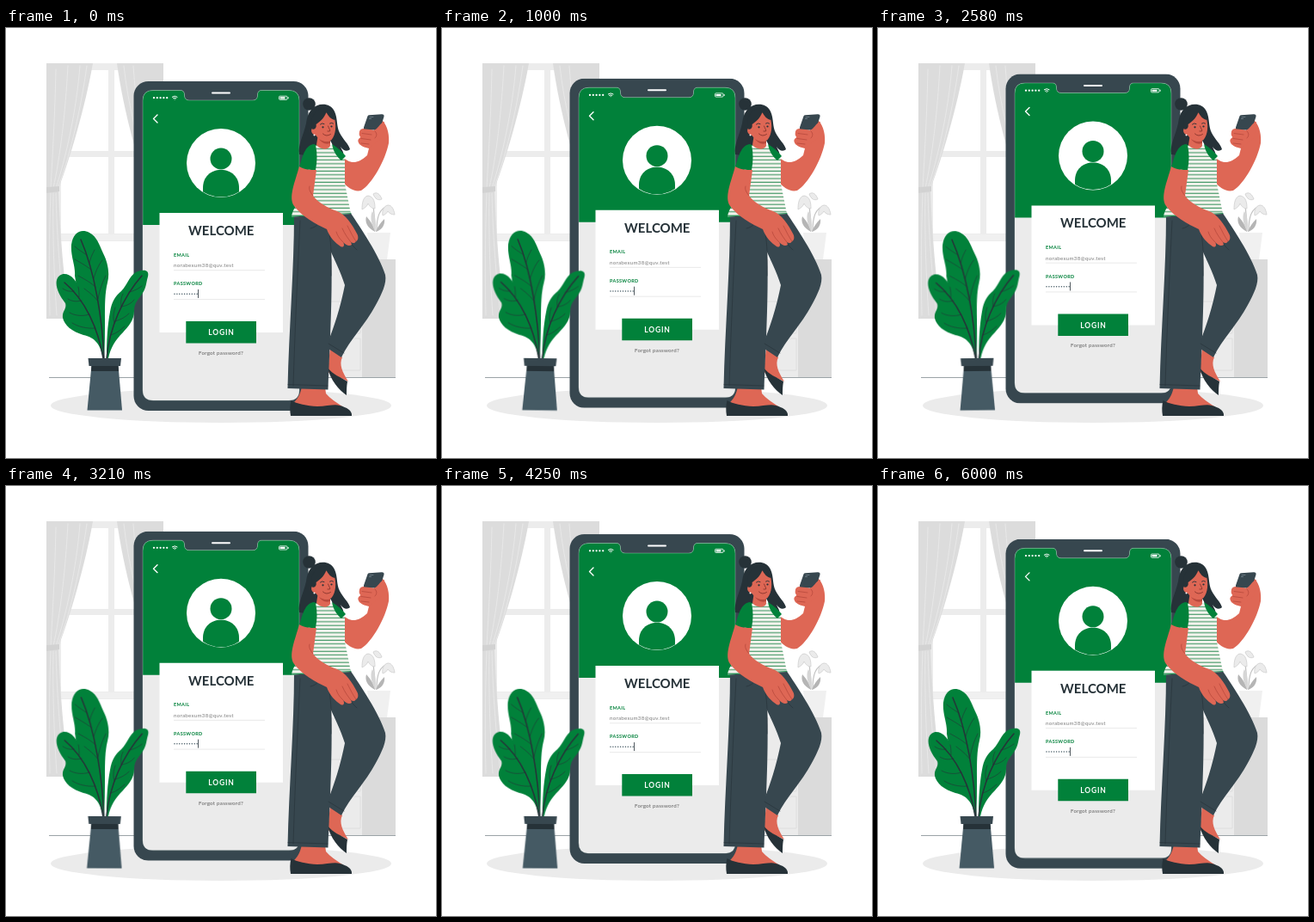
Write an HTML page that moves like this. It is 500 px wide and 500 px high and loops after 6040 ms.

```html
<!DOCTYPE html>
<html lang="en">
<head>
<meta charset="utf-8">
<title>Welcome login</title>
<style>
  html, body { margin: 0; width: 100%; height: 100%; overflow: hidden; background: #fff; }
  svg { display: block; width: 100%; height: 100%; font-family: Lato, "Open Sans", sans-serif; }
  .green { fill: #01813a; }
  .slate { fill: #37474f; }
  .ink { fill: #263238; }
  .skin { fill: #de6755; }
  .line { fill: none; stroke-linecap: round; stroke-linejoin: round; }
  .label { font-size: 5.5px; font-weight: 700; letter-spacing: .35px; }
  .small { font-size: 6.2px; letter-spacing: .25px; }
  #plant { transform-origin: 112px 340px; }
</style>
</head>
<body>
<svg viewBox="0 0 500 500">
  <defs>
    <pattern id="stripes" width="80" height="4.3" y="1" patternUnits="userSpaceOnUse">
      <rect width="80" height="4.3" fill="#f4f4ee"/>
      <rect y="1.5" width="80" height="1.1" fill="#3f9663"/>
    </pattern>
    <clipPath id="avatar"><circle cx="250" cy="157" r="39.5"/></clipPath>
    <clipPath id="screen"><path id="screenShape" d="M171 72.500H203Q207 72.500 207.500 77V79Q208 84 213 84H287Q292 84 292.500 79V77Q293 72.500 297 72.500H329Q341 72.500 341 84.500V421Q341 433 329 433H171Q159 433 159 421V84.500Q159 72.500 171 72.500Z"/></clipPath>
  </defs>

  <!-- window -->
  <g>
    <path fill="#ececec" d="M47 41H183V248H60Z"/>
    <path fill="#fff" d="M72 49H119V143H66V49ZM126 49H176V143H126ZM64 150H119V239H64ZM126 150H176V239H126Z"/>
    <path fill="#f0f0f0" d="M60 240H183V247H60Z"/>
    <path fill="#dcdcdc" d="M47 41H101C92 92 75 150 61 187C63 240 67 295 75 338H47Z"/>
    <path fill="#dcdcdc" d="M129 41H183V190H168C152 155 136 92 129 41Z"/>
    <g class="line" stroke="#e9e9e9" stroke-width=".9">
      <path d="M86 44C82 95 70 150 58 186M72 44C69 100 63 150 55 186M58 48C57 100 54 150 52 186M94 44C87 95 73 155 60 186"/>
      <path d="M58 192C59 240 63 290 68 334M55 192C54 240 56 290 59 334M52 192C50 240 50 290 51 334"/>
      <path d="M137 44C142 90 153 130 164 170M148 44C151 90 158 130 168 170"/>
    </g>
    <path fill="#d2d2d2" d="M47 185L62 184V190L47 192Z"/>
  </g>

  <!-- cabinet and flowers -->
  <path fill="#ebebeb" d="M340 269H414V406H340Z"/>
  <path fill="#dbdbdb" d="M414 269H453V406H414Z"/>
  <path class="line" stroke="#dedede" stroke-width="1" d="M350 318H412V355H350ZM350 361H412V398H350Z"/>
  <g>
    <path fill="#f0f0f0" d="M420 238H447L443 269H424Z"/>
    <path class="line" stroke="#c2c2c2" stroke-width="1.2" d="M429 236C428 218 429 204 421 196M431 236C431 220 434 210 444 207"/>
    <path fill="#b5b5b5" d="M429 237C420 232 417 226 419 219C424 225 428 230 429 237ZM430 237C433 229 438 224 440 222C441 229 437 235 430 237Z"/>
    <path fill="#d6d6d6" d="M429 236C423 225 424 217 426 213C430 220 431 229 429 236Z"/>
    <path fill="#ebebeb" stroke="#d0d0d0" stroke-width=".8" d="M421 195C415 196 414 204 414 211C418 209 420 207 421 204C423 208 426 210 429 210C429 203 428 196 421 195ZM427 193C431 190 435 193 437 199C433 201 429 199 427 193ZM444 206C439 207 437 213 438 218C441 217 443 215 444 213C446 216 449 217 452 217C451 211 449 206 444 206Z"/>
  </g>

  <!-- floor -->
  <path stroke="#37474f" stroke-width=".5" d="M50 406.500H453"/>
  <ellipse cx="250" cy="439" rx="198" ry="20" fill="#ebebeb"/>

  <g id="phone">
    <rect class="slate" x="148.500" y="62" width="203" height="383" rx="17"/>
    <g clip-path="url(#screen)">
      <path fill="#ebebeb" d="M159 72H341V433H159Z"/>
      <path class="green" d="M159 72H341V229H159Z"/>
    </g>
    <use href="#screenShape" fill="none" stroke="#e5eee8" stroke-width=".3"/>
    <path class="line" stroke="#fff" stroke-width="2" d="M240 75.500H260"/>
    <path class="line" stroke="#fff" stroke-width="2.3" stroke-dasharray="0 3.800" d="M172 81.200H188"/>
    <path class="line" stroke="#fff" stroke-width="1" d="M193.300 80.200Q196.200 78 199.100 80.200M194.600 81.700Q196.200 80.600 197.800 81.700M196.200 83V83.100"/>
    <rect x="317.500" y="79.200" width="9.500" height="4.200" rx="1" fill="none" stroke="#fff" stroke-width=".8"/>
    <path fill="#fff" d="M318.500 80.200H324.500V82.400H318.500ZM327.600 80.300H328.600V82.300H327.600Z"/>
    <path class="line" stroke="#fff" stroke-width="1.400" d="M176 101L171.500 105.500L176 110"/>

    <circle cx="250" cy="157" r="40" fill="#fff"/>
    <g class="green" clip-path="url(#avatar)">
      <circle cx="250" cy="152" r="12.500"/>
      <path d="M229 198V186C229 173 238 165 250 165S271 173 271 186V198Z"/>
    </g>

    <path fill="#fff" d="M178.500 215H322V354H178.500Z"/>
    <text class="ink" x="250.300" y="241" font-size="15" font-weight="700" text-anchor="middle">WELCOME</text>
    <text class="label green" x="195" y="265.800">EMAIL</text>
    <text class="small" x="195" y="278.300" fill="#7b7b7b" letter-spacing=".4">norabexum38@quv.test</text>
    <text class="label green" x="195" y="299.200">PASSWORD</text>
    <path stroke="#e0e0e0" stroke-width=".7" d="M195 281.700H301M195 315.500H301"/>
    <path class="line" stroke="#455a64" stroke-width="1.500" stroke-dasharray="0 2.900" d="M196 309.200H222.500"/>
    <path stroke="#263238" stroke-width=".8" d="M223.500 304V314"/>
    <path class="green" d="M209.300 341H291V366.500H209.300Z"/>
    <text x="250.500" y="357.400" fill="#fff" font-size="8.5" font-weight="700" letter-spacing=".8" text-anchor="middle">LOGIN</text>
    <text class="small" x="250" y="380" fill="#5c5c5c" text-anchor="middle">Forgot password?</text>
  </g>

  <g id="plant">
    <g class="green">
      <path d="M113 384C109 366 103 360 90 357C77 353 68 346 66 337C65 329 71 327 69 320C62 311 57 301 59 293C62 284 72 284 79 292C87 303 97 312 102 327C107 345 110 362 113 384Z"/>
      <path d="M113 384C111 366 105 352 98 336C92 320 82 306 80 288C81 276 75 266 76 252C78 238 87 233 97 238C106 243 108 251 113 262C118 272 121 284 118 296C115 308 115 322 115 338C115 354 115 368 114 384Z"/>
      <path d="M117 384C117 364 118 346 121 330C123 318 127 312 134 306C141 299 143 289 151 284C160 280 167 281 165 289C163 296 163 302 159 308C154 316 149 319 149 329C149 340 142 347 136 354C127 363 122 371 119 384Z"/>
    </g>
    <g class="line" stroke="#263238" stroke-width="1">
      <path stroke-width="1.500" d="M113 384C107 349 92 316 68 296M114 384C112 340 104 285 87 246M117 384C120 349 136 313 158 288"/>
      <path stroke-width=".6" d="M79 306C73 307 69 305 66 303M88 317C80 319 75 317 72 315M97 333C88 336 79 334 74 331M104 349C94 350 83 347 77 343M84 301C85 305 85 309 85 313"/>
      <path stroke-width=".6" d="M94 264C88 260 83 257 80 254M99 281C91 275 85 272 80 269M104 301C96 294 89 291 84 288M107 318C102 311 96 307 91 303M97 273C99 265 101 262 103 258M102 291C105 281 108 275 112 270M107 315C109 304 112 296 116 288"/>
      <path stroke-width=".6" d="M143 307C149 306 154 303 158 300M134 324C141 323 146 320 149 316M127 341C134 339 139 336 143 332M122 357C129 355 133 351 138 347M134 324C133 318 134 313 136 309M126 343C124 337 125 331 127 325"/>
    </g>
    <path fill="#455a64" d="M99.500 392H130.500L135 444.500H94.500Z"/>
    <path class="ink" d="M99.500 392H130.500L131 399H99Z"/>
    <path class="slate" d="M95.500 384H134L133 393H96.500Z"/>
  </g>

  <!-- woman -->
  <g>
    <path class="skin" d="M377 371L391 383C387 391 391 400 398 411L374 400Z"/>
    <path class="ink" d="M374 395C380 403 389 406 397 411C396 417 396 421 396 427C387 421 377 409 374 395Z"/>
    <path class="skin" d="M344 417H371L372 425C377 431 384 435 391 440L360 443L333 437C338 433 342 427 344 417Z"/>
    <path class="ink" d="M331.500 433C338 437 350 439.500 362 440C373 440 382 437 388 439C396 441 403 445 402 451H331C330 445 330 439 331.500 433Z"/>
    <path class="slate" d="M362 219L400 214C412 232 434 264 441 287C443 297 437 309 430 322C418 345 400 362 390 383L372 371C382 347 389 324 394 299C389 283 382 270 376 256Z"/>
    <path class="slate" d="M335 217L384 217C380 230 377 246 378 262C380 301 377 360 374.500 420.500L327.500 419C329 350 335 281 335 217Z"/>
    <path class="line" stroke="#263238" stroke-width=".6" d="M376 239C379 258 378 270 378 288M342 224C339 285 336 350 334 416M328 414.500L374 416M375 367L393 378M390 228C393 240 401 252 408 258M366 222C364 228 360 232 354 233"/>

    <path class="skin" d="M390 149C399 157 407 160 420 148L422 140C417 139 412 137 410 133C408 129 412 128 413 126C409 122 411 117 416 117L428 119C431 114 433 107 438 108C444 114 446 126 445 134C441 154 426 181 413 189C405 191 397 186 391 178Z"/>
    <path class="slate" d="M420.500 102.500Q421 101.300 422.500 101.200L437 100.200Q440 100.300 439.500 103L435.500 116Q434.500 118.500 433 118.500L418 118.500Q415.500 118 416 115.500Z"/>
    <path class="line" stroke="#75868e" stroke-width=".8" d="M423 103.700L427 103.400M422.500 105.500L424.500 105.400"/>
    <path class="skin" d="M412 120C414 116 422 118 428 119L431 117C434 114 436 110 440 109L437 128L424 138C418 139 411 137 410 133C409 130 412 129 414 128C410 126 410 122 412 120Z"/>
    <path class="line" stroke="#a93f35" stroke-width=".6" d="M414 122.500L425 124M413 128.500L424 130M413 134L422 135M429 120C432 123 431 126 429 128"/>

    <!-- hair behind the face -->
    <circle class="ink" cx="352.500" cy="88.500" r="7.300"/>
    <path class="ink" d="M356 94C362 87 377 86 382 97C386 106 384 114 388 122C392 130 398 134 400 141C397 144 392 143 389 138C391 143 394 146 391 147C381 143 378 130 373 125C365 137 362 147 355 148C350 149 345 147 341 147C339 136 346 125 349 111C350 103 352 98 356 94Z"/>

    <path fill="url(#stripes)" d="M359 136L381 137L394 152L394 181L401 216L332 219.500C334 205 352 190 358 165Z"/>
    <path class="line" stroke="#01813a" stroke-width=".8" d="M332 219L401 215.500"/>
    <path class="green" d="M358 135C350 136 346 143 341 162C347 165 353 165 360 165C362 155 362 145 360 136Z"/>
    <path class="green" d="M379 135C386 139 391 144 395 149L390 154C385 150 381 145 379 135Z"/>
    <path class="skin" d="M363 123L377 127V137C374 143 365 141 361 136Z"/>
    <path fill="#b94a3d" d="M364 129C369 132 373 133 377 131V134C371 136 367 133 364 129Z"/>

    <g transform="translate(-1.500 0)">
      <path class="skin" d="M360 103C365 97 378 96 383 104C386 113 385 124 380 130C375 134 366 131 362 125C357 124 355 119 358 116C359 114 360 113 361 114Z"/>
      <path class="ink" d="M358 118C355 110 357 98 367 94C377 91 384 98 384 107C379 106 376 102 374 98C371 106 365 110 362 112C363 115 361 118 358 118Z"/>
      <path class="line" stroke="#263238" stroke-width=".9" d="M367 112Q369 110 371.500 111.500M378 111Q380 109.500 382 111"/>
      <circle class="ink" cx="370" cy="115.300" r="1.100"/>
      <circle class="ink" cx="380" cy="114.500" r="1.100"/>
      <path class="line" stroke="#7c2e28" stroke-width=".8" d="M376 114C377 117 379 119 378 120L375.500 120M370 123Q374 127 379 123.500"/>
      <circle cx="360" cy="124.500" r="1" fill="#fff"/>
    </g>

    <path class="skin" d="M341 161C336 179 328 197 335 207C344 219 360 228 373 234C376 243 383 250 389 254C393 256 394 252 392 249C396 253 399 254 402 252L401 249C404 251 406 250 407 248C410 247 410 242 408 239C403 229 395 217 385 213C374 209 363 203 357 195L361 165C354 165 347 165 341 161Z"/>
    <path class="line" stroke="#a93f35" stroke-width=".6" d="M384 237C386 243 389 246 392 249M391 233C394 240 398 245 401 249M397 230C401 238 404 244 407 248M357 195C353 190 352 187 353 184"/>
  </g>
</svg>
<script>
  const LOOP = 6040;
  const play = (id, frames, duration) =>
    document.getElementById(id).animate(frames, { duration, iterations: Infinity });

  play('phone', [0, -10, 0].map(y => ({ transform: `translateY(${y}px)` })), LOOP);

  const sway = [[0, 0], [.25, 1], [.75, -1], [1, 0]];
  play('plant', sway.map(([offset, deg]) => ({ offset, transform: `rotate(${deg}deg)` })), LOOP / 2);
</script>
</body>
</html>
```
